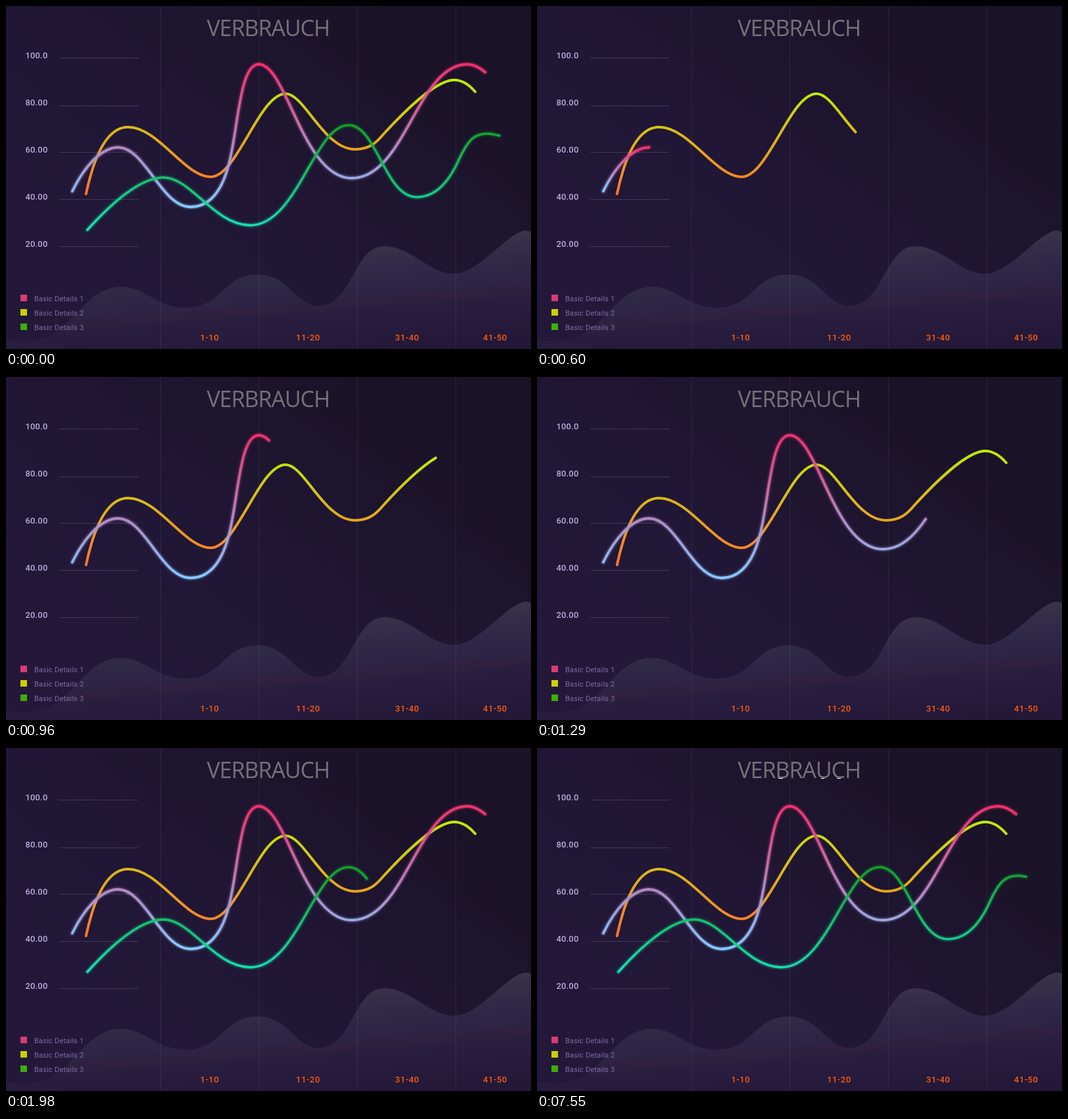
Animation, 800 px wide and 524 px high, one loop 7.65 s. Source, as an HTML page:

```html
<!DOCTYPE html>
<html lang="de">
<head>
<meta charset="utf-8">
<title>Verbrauch</title>
<style>
  html, body { margin: 0; width: 100%; height: 100%; overflow: hidden; background: #20173a; }
  svg { display: block; width: 800px; height: 524px; }
  text { font-family: Roboto, "Open Sans", sans-serif; }
  .title { font: 34px "Open Sans", "Noto Sans", sans-serif; letter-spacing: -1px; fill: #767179; }
  .value { font-size: 13px; font-weight: 500; letter-spacing: .15px; fill: #b9aedb; }
  .range { font-size: 13px; font-weight: 500; letter-spacing: .55px; fill: #ff5a0a; }
  .legend { font-size: 11px; letter-spacing: .22px; fill: #7c6fa5; }
  .curve { fill: none; stroke-linecap: round; }
</style>
</head>
<body>
<svg id="stage" viewBox="0 0 800 524" xmlns="http://www.w3.org/2000/svg">
  <defs id="defs">
    <linearGradient id="night" gradientUnits="userSpaceOnUse" x1="200" y1="524" x2="600" y2="0">
      <stop offset="0" stop-color="#23183a"/>
      <stop offset=".5" stop-color="#201634"/>
      <stop offset="1" stop-color="#1a1226"/>
    </linearGradient>
    <linearGradient id="hill" gradientUnits="userSpaceOnUse" x1="600" y1="345" x2="614" y2="524">
      <stop offset="0" stop-color="#3f374a"/>
      <stop offset=".28" stop-color="#322a48"/>
      <stop offset=".5" stop-color="#2d2446"/>
      <stop offset=".57" stop-color="#2f2040"/>
      <stop offset=".65" stop-color="#291e40"/>
      <stop offset="1" stop-color="#231838"/>
    </linearGradient>
    <filter id="soft" filterUnits="userSpaceOnUse" x="0" y="0" width="800" height="524">
      <feGaussianBlur stdDeviation="1.5"/>
    </filter>
  </defs>
  <rect width="800" height="524" fill="url(#night)"/>
  <path fill="url(#hill)" d="M0,510 C20,513 45,515 68,503 C105,484 127,429 175,429 C212,429 230,461 274,461
    C330,461 330,410 384,410 C430,410 442,458 475,458 C530,458 528,367 577,367 C617,367 645,409 682,409
    C722,409 765,343 793,343 L800,345 V524 H0 Z"/>
  <g id="grid"></g>
  <g id="curves"></g>
  <text class="title" x="306" y="46">VERBRAUCH</text>
  <path id="glint" d="M368,46.5 h7 M433,46.5 h5 M457,46.5 h6" stroke="#e8e6ee"/>
</svg>
<script>
const LOOP = 7650, STEP = 30, LAST_STEP = 2550, GLINT_AT = 7550, DRAW_TIME = 1240;

const series = [
  { start: 12, low: '#ff732d', high: '#bdeb0a', width: 4, glow: 0,
    d: `M122,287 C132,240 150,185 186,185 C232,185 272,261 312,261 C352,261 386,134 426,134
        C455,134 484,219 532,219 C554,219 565,208 575,196 C605,163 655,113 683,113 C697,113 708,123 715,131` },
  { start: 526, low: '#86c8ff', high: '#f2306d', width: 3.8, glow: .4,
    d: `M101,283 C117,250 143,216 171,216 C212,216 237,307 281,307 C312,307 330,280 340,240
        C354,185 356,89 385,89 C428,89 452,263 527,263 C608,263 627,89 703,89 C715,89 724,96 730,101` },
  { start: 1398, low: '#16e2b6', high: '#12a128', width: 3.4, glow: .4,
    d: `M124,342 C152,311 200,262 240,262 C282,262 318,335 372,335 C444,335 470,182 522,182
        C565,182 577,292 626,292 C658,292 678,262 690,235 C703,207 712,195 733,195 C740,195 746,197 752,198` }
];

const byId = id => document.getElementById(id);

function add(parent, tag, attrs, text) {
  const node = document.createElementNS('http://www.w3.org/2000/svg', tag);
  for (const key in attrs) node.setAttribute(key, attrs[key]);
  if (text) node.textContent = text;
  parent.appendChild(node);
  return node;
}

function buildGrid() {
  const grid = byId('grid');
  const line = (d, opacity) => add(grid, 'path', { d, stroke: '#fff', 'stroke-opacity': opacity });
  [235.5, 385.5, 535.5, 685.5].forEach(x => line(`M${x},0V524`, .07));
  [79.5, 152.5, 223.5, 295.5, 367.5].forEach(y => line(`M81,${y}H202`, .15));
  ['100.0', '80.00', '60.00', '40.00', '20.00'].forEach((label, i) =>
    add(grid, 'text', { class: 'value', x: 29.5, y: 80 + 72 * i }, label));
  [['1-10', 296], ['11-20', 442], ['31-40', 593], ['41-50', 727]].forEach(([label, x]) =>
    add(grid, 'text', { class: 'range', x, y: 511 }, label));
  ['#dc3a74', '#cbd004', '#40ad08'].forEach((fill, i) => {
    add(grid, 'rect', { x: 22, y: 441 + 22 * i, width: 10, height: 10, fill });
    add(grid, 'text', { class: 'legend', x: 43, y: 451 + 22 * i }, `Basic Details ${i + 1}`);
  });
}

function buildCurve(item, index) {
  const id = `ramp${index}`;
  item.ramp = add(byId('defs'), 'linearGradient', { id, gradientUnits: 'userSpaceOnUse', x1: 0, x2: 0 });
  add(item.ramp, 'stop', { offset: 0, 'stop-color': item.low });
  add(item.ramp, 'stop', { offset: 1, 'stop-color': item.high });
  item.group = add(byId('curves'), 'g', { class: 'curve', stroke: `url(#${id})` });
  if (item.glow) {
    add(item.group, 'path', { d: item.d, 'stroke-width': item.width + 2.5, opacity: item.glow, filter: 'url(#soft)' });
  }
  const path = add(item.group, 'path', { d: item.d, 'stroke-width': item.width });
  item.length = path.getTotalLength();

  // Running vertical extent, since the colour ramp spans only the drawn part.
  let top = Infinity, bottom = -Infinity;
  item.extent = Array.from({ length: 301 }, (_, i) => {
    const { y } = path.getPointAtLength(item.length * i / 300);
    top = Math.min(top, y);
    bottom = Math.max(bottom, y);
    return [top, bottom];
  });
}

// cubic-bezier(0, 0, .58, 1)
function easeOut(x) {
  if (x <= 0) return 0;
  if (x >= 1) return 1;
  let lo = 0, hi = 1;
  for (let i = 0; i < 24; i++) {
    const s = (lo + hi) / 2;
    if (s * s * (1.74 - .74 * s) < x) lo = s; else hi = s;
  }
  return lo * lo * (3 - 2 * lo);
}

function drawCurve(item, progress) {
  item.group.setAttribute('visibility', progress > 0 ? 'visible' : 'hidden');
  const [top, bottom] = item.extent[Math.ceil(progress * 300)];
  item.ramp.setAttribute('y1', bottom);
  item.ramp.setAttribute('y2', Math.min(top, bottom - .5));
  item.group.setAttribute('stroke-dasharray', progress < 1 ? `${item.length * progress} ${item.length * 2}` : 'none');
}

function render(time) {
  const t = Math.min(Math.floor(time / STEP) * STEP, LAST_STEP);
  series.forEach(item => drawCurve(item, t < STEP ? 1 : easeOut((t - item.start) / DRAW_TIME)));
  byId('glint').setAttribute('visibility', time >= GLINT_AT ? 'visible' : 'hidden');
}

buildGrid();
series.forEach(buildCurve);
const origin = performance.now();
function tick() {
  render((performance.now() - origin) % LOOP);
  requestAnimationFrame(tick);
}
render(0);
requestAnimationFrame(tick);
</script>
</body>
</html>
```
